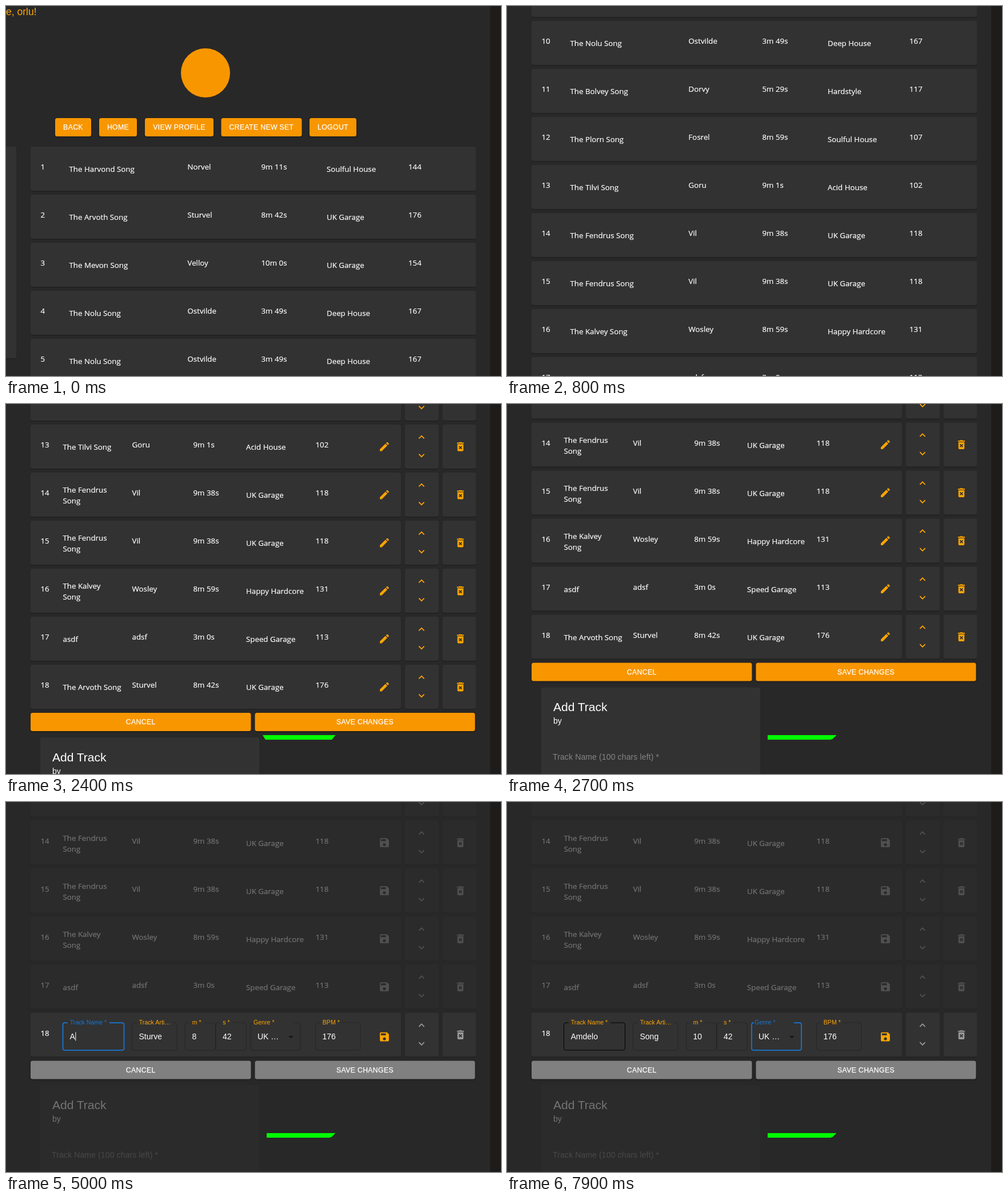
These frames come from a looping animation (866x647 px, 8000 ms). An HTML page:

```html
<!DOCTYPE html>
<html lang="en">
<head>
<meta charset="utf-8">
<title>Set editor</title>
<style>
  html, body { margin: 0; width: 100%; height: 100%; overflow: hidden; background: #282828; }
  svg { display: block; }
  #stage { width: 866px; height: 647px; }
  text { font-family: "Liberation Sans", Arial, sans-serif; white-space: pre; }
  .cell { font-family: "Open Sans", "Noto Sans", sans-serif; font-size: 13.3px; fill: #fff; stroke: #fff; stroke-width: .2px; }
  .button { font-size: 12.25px; letter-spacing: .35px; text-anchor: middle; fill: #fff; stroke: #fff; stroke-width: .25px; }
  .label { font-size: 10.5px; letter-spacing: .05px; }
  .value { font-size: 14px; fill: #fff; }
  .raised { filter: drop-shadow(0 1px 1.5px rgba(0, 0, 0, .4)); }
</style>
</head>
<body>
<svg id="stage" viewBox="0 0 866 647"></svg>
<script>
const LOOP = 8000, STEP = 100;
const BG = '#282828', PANEL = '#323232', ORANGE = '#f89600', ACCENT = '#ffa500', BLUE = '#1976d2', GREY = '#9a9a9a';
const ROW_TOP = 246, ROW_PITCH = 84, ROW_HEIGHT = 77, BOTTOM = 1218;

// A bar marks where a title wraps in the narrow column.
const nolu = 'The Nolu Song,Ostvilde,3m 49s,Deep House,167';
const fendrus = 'The Fendrus|Song,Vil,9m 38s,UK Garage,118';
const arvoth = 'The Arvoth Song,Sturvel,8m 42s,UK Garage,176';
const tracks = [
  'The Harvond Song,Norvel,9m 11s,Soulful House,144',
  arvoth,
  'The Mevon Song,Velloy,10m 0s,UK Garage,154',
  nolu, nolu, nolu, nolu, nolu, nolu, nolu,
  'The Bolvey Song,Dorvy,5m 29s,Hardstyle,117',
  'The Plorn Song,Fosrel,8m 59s,Soulful House,107',
  'The Tilvi Song,Goru,9m 1s,Acid House,102',
  fendrus, fendrus,
  'The Kalvey|Song,Wosley,8m 59s,Happy Hardcore,131',
  'asdf,adsf,3m 0s,Speed Garage,113',
  arvoth
].map(line => line.split(','));

const icons = {
  pencil: 'M3 17.25V21h3.75L17.81 9.94l-3.75-3.75zM20.71 7.04a1 1 0 0 0 0-1.41l-2.34-2.34a1 1 0 0 0-1.41 0l-1.83 1.83 3.75 3.75z',
  save: 'M17 3H5a2 2 0 0 0-2 2v14a2 2 0 0 0 2 2h14a2 2 0 0 0 2-2V7zM12 19a3 3 0 1 1 0-6 3 3 0 0 1 0 6zM15 9H5V5h10z',
  trash: 'M6 19a2 2 0 0 0 2 2h8a2 2 0 0 0 2-2V7H6zm2.46-7.12 1.41-1.41L12 12.59l2.12-2.12 1.41 1.41L13.41 14l2.12 2.12-1.41 1.41L12 15.41l-2.12 2.12-1.41-1.41L10.59 14zM15.5 4l-1-1h-5l-1 1H5v2h14V4z',
  up: 'm12 8-6 6 1.41 1.41L12 10.83l4.59 4.58L18 14z',
  down: 'M16.59 8.59 12 13.17 7.41 8.59 6 10l6 6 6-6z'
};

const stage = document.getElementById('stage');
const ruler = document.createElement('canvas').getContext('2d');
ruler.font = '14px "Liberation Sans", Arial, sans-serif';
const textWidth = s => ruler.measureText(s).width;

const clamp = v => Math.min(1, Math.max(0, v));
const mix = (a, b, k) => `rgb(${a.map((v, i) => Math.round(v + (b[i] - v) * k))})`;
const rect = (x, y, w, h, fill, r = 0, cls = '') =>
  `<rect x="${x}" y="${y}" width="${w}" height="${h}" rx="${r}" fill="${fill}" class="${cls}"/>`;
const text = (x, y, s, cls = 'cell', extra = '') => `<text x="${x}" y="${y}" class="${cls}" ${extra}>${s}</text>`;
const group = (y, body, opacity = 1) => `<g transform="translate(0 ${y})" opacity="${opacity}">${body}</g>`;
const panel = (x, y, w, h) => rect(x, y + 1.5, w, h, 'rgba(0,0,0,.22)', 3.5) + rect(x, y, w, h, PANEL, 3.5);
const icon = (name, x, y, fill) =>
  `<path d="${icons[name]}" fill="${fill}" fill-rule="evenodd" transform="translate(${x - 10.5} ${y - 10.5}) scale(.875)"/>`;
const button = (x, y, w, label, fill = ORANGE) =>
  rect(x, y, w, 32, fill, 3.5, 'raised') + text(x + w / 2, y + 20, label, 'button');

const rowTop = i => ROW_TOP + i * ROW_PITCH;

function trackCells(i, [title, artist, time, genre, bpm], columns, wrap) {
  const [tx, ax, dx, gx, bx] = columns;
  const parts = wrap ? title.split('|') : [title.replace('|', ' ')];
  const firstLine = parts.length > 1 ? 35 : 44;
  return text(60.5, 40, i + 1) +
    parts.map((part, n) => text(tx, firstLine + n * 19, part)).join('') +
    text(ax, 40, artist) + text(dx, 40, time) + text(gx, 44, genre) + text(bx, 40, bpm);
}

function viewPage(scroll, hover) {
  const nav = [[86, 63, 'BACK'], [163, 66, 'HOME'], [243, 120, 'VIEW PROFILE'], [376.5, 141, 'CREATE NEW SET'], [531, 82, 'LOGOUT']];
  const rows = tracks.map((track, i) => group(rowTop(i),
    panel(43, 0, 779, ROW_HEIGHT) + trackCells(i, track, [110.5, 317.5, 446.5, 561, 704], false)));
  return group(-scroll,
    text(0, 16, 'e, orlu!', '', `font-size="17.5" fill="${ACCENT}"`) +
    `<circle cx="349" cy="117" r="43" fill="${ORANGE}"/>` +
    nav.map(([x, w, label]) => button(x, 196, w, label)).join('') +
    panel(-20, 246, 38, 370) + rows.join('') +
    button(39, BOTTOM + 536.5, 786.5, 'EDIT', mix([248, 150, 0], [232, 138, 0], hover)) +
    button(39, BOTTOM + 589.5, 786.5, 'DELETE SET', '#d32f2f'));
}

// Outlined input; the top edge leaves a gap for the label.
function field({ x, w, gap, label, value, clip, focus, selected, caret, hovered, select }) {
  const lx = select ? x + 5 : x + 12.3, vx = x + 12, r = x + w;
  const stroke = focus ? BLUE : hovered ? '#000' : 'rgba(0,0,0,.25)';
  const end = vx + Math.min(textWidth(value), clip);
  return `<path d="M${x + gap} 17.5H${r - 3.5}q3.5 0 3.5 3.5V62q0 3.5-3.5 3.5H${x + 3.5}q-3.5 0-3.5-3.5V21q0-3.5 3.5-3.5H${lx - 4}"
      fill="none" stroke="${stroke}" stroke-width="${focus ? 1.75 : 1}"/>` +
    text(lx, 20.5, label, 'label', `fill="${focus ? BLUE : ACCENT}"`) +
    (selected ? rect(vx, 33, end - vx, 17, '#2f78d0') : '') +
    `<svg x="${vx}" y="28" width="${clip}" height="26">${text(0, 18, value, 'value')}</svg>` +
    (caret ? rect(end + .5, 34, 1, 15, '#fff') : '') +
    (select ? `<path d="M${r - 21} 40.5h8.8l-4.4 4.4z" fill="#171717"/>` : '');
}

function typed(t, before, word, times) {
  const count = times.filter(at => t >= at).length;
  return count ? word.slice(0, count) : before;
}

function editor(t) {
  const between = (a, b) => t >= a && t < b;
  const fields = [
    { x: 99.5, w: 107, gap: 81.5, label: 'Track Name *', clip: 53.5,
      value: typed(t, 'The Arvoth Song', 'Amdelo', [5000, 5300, 5400, 5500, 5600, 5800]),
      focus: between(4000, 6000), selected: between(4300, 5000), caret: between(5000, 6000), hovered: t >= 6000 },
    { x: 220.5, w: 78.5, gap: 71, label: 'Track Arti…', clip: 39.5,
      value: typed(t, 'Sturvel', 'Song', [6300, 6400, 6500, 6600]),
      focus: between(6000, 6800), selected: between(6000, 6300), caret: between(6300, 6800) },
    { x: 313.5, w: 53, gap: 32, label: 'm *', clip: 29, value: typed(t, '8', '10', [7200, 7300]),
      focus: between(6800, 7500), selected: between(6800, 7200), caret: between(7200, 7500) },
    { x: 367, w: 53, gap: 29, label: 's *', clip: 29, value: '42',
      focus: between(7500, 7800), selected: between(7500, 7800) },
    { x: 428, w: 87, gap: 74, label: 'Genre *', clip: 42, value: 'UK …', focus: t >= 7800, select: true },
    { x: 541.5, w: 78.5, gap: 46, label: 'BPM *', clip: 50, value: '176' }
  ];
  const glow = t < 3700 ? .18 : t < 4000 ? .12 : 0;
  return text(60.5, 40, tracks.length) + fields.map(field).join('') +
    rect(634, 25.5, 56, 32, `rgba(255,165,0,${glow})`, 3.5) + icon('save', 662, 42, ACCENT);
}

function editPage(t) {
  const scroll = BOTTOM + 87.5 * clamp((t - 2400) / 300);
  const editing = t >= 3400;
  const dim = editing ? .35 : 1;
  const tint = editing ? GREY : ACCENT;
  const last = tracks.length - 1;
  const rows = tracks.map((track, i) => {
    if (i < 10) return '';
    const active = editing && i === last;
    const hover = i === last && t >= 3000 ? rect(634, 22.5, 56, 32, `rgba(255,165,0,${t < 3300 ? .06 : .15})`, 3.5) : '';
    const content = active ? editor(t)
      : trackCells(i, track, [99.5, 220.5, 327.5, 420, 541.5], true) + hover +
        icon(editing ? 'save' : 'pencil', 662, 38.5, tint);
    return group(rowTop(i),
      panel(43, 0, 648, ROW_HEIGHT) + panel(698, 0, 59, ROW_HEIGHT) + panel(764, 0, 58, ROW_HEIGHT) + content +
      icon('up', 727, 22, tint) + icon('down', 727, 54, tint) + icon('trash', 795, 38.5, tint),
      active ? 1 : dim);
  });
  const fill = mix([248, 150, 0], [128, 128, 128], clamp((t - 3300) / 250));
  const card = panel(60, 583, 383, 400) +
    text(81, 624.5, 'Add Track', '', 'font-size="21" fill="#fff"') +
    text(81, 646.5, 'by', '', 'font-size="14" fill="#fff"') +
    text(80, 709.5, 'Track Name (100 chars left) *', '', 'font-size="14" letter-spacing=".13" fill="#858585"');
  const flag = t < 2500 ? 'M449 579H576.5L570 587H454Z' : 'M456 579H576.5L570 585.5 566 587H456Z';
  return group(-scroll, rows.join('') + group(BOTTOM,
      button(43, 540, 385.5, 'CANCEL', fill) + button(435.5, 540, 385, 'SAVE CHANGES', fill) + group(0, card, dim))) +
    `<path d="${flag}" fill="#0f0"/>`;
}

function draw(t) {
  const scroll = t < 400 ? 0 : Math.min(BOTTOM, 8 + 2.42 * (t - 400));
  const page = t < 1900 ? viewPage(scroll, clamp((t - 1400) / 300)) : editPage(t);
  stage.innerHTML = rect(0, 0, 866, 647, BG) + page + rect(847, 0, 19, 647, '#1e1c1a');
}

let shown = -1;
const start = performance.now();
function tick() {
  const t = Math.floor(((performance.now() - start) % LOOP) / STEP) * STEP;
  if (t !== shown) draw(shown = t);
  requestAnimationFrame(tick);
}
tick();
</script>
</body>
</html>
```
